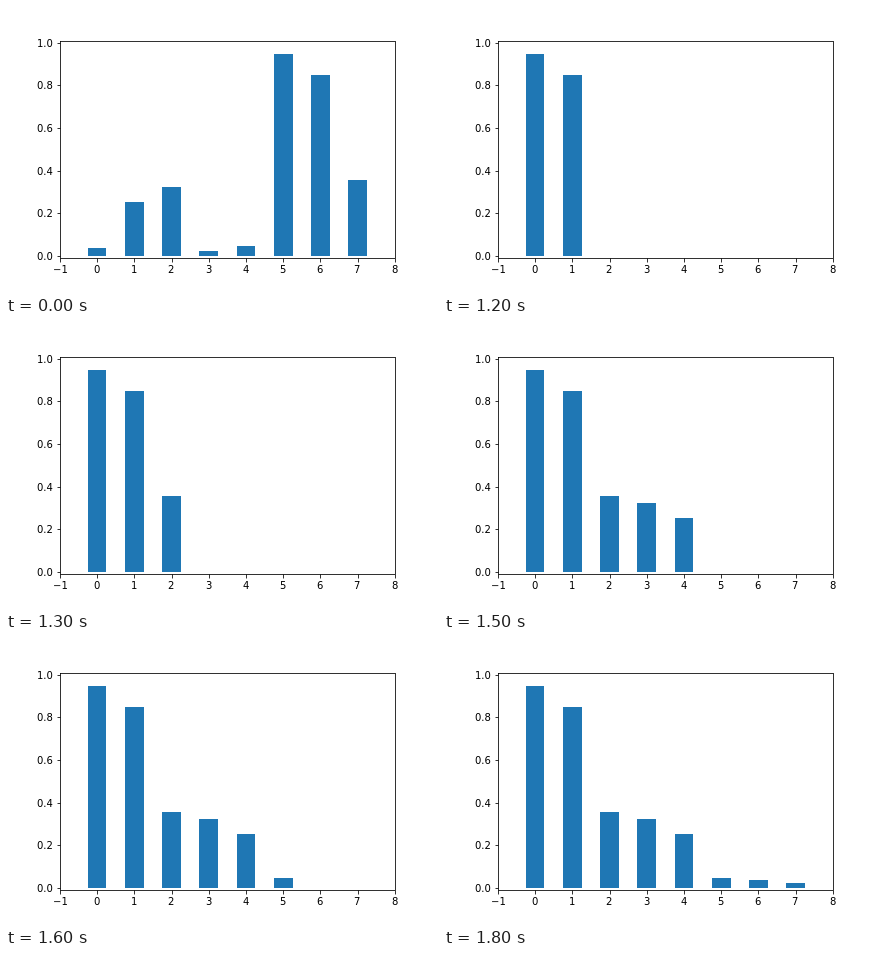
An HTML page with a canvas for the animation above (2.9 s loop, 432x288 px).

```html
<!DOCTYPE html>
<html lang="en">
<head>
<meta charset="utf-8">
<title>Sorted bars</title>
<style>
  html, body { margin: 0; width: 100%; height: 100%; overflow: hidden; background: #fff; }
  canvas { display: block; }
</style>
</head>
<body>
<canvas id="chart" width="432" height="288"></canvas>
<script>
const ctx = document.getElementById('chart').getContext('2d');
const LOOP = 2900, HOLD = 1100, STEP = 100;
const LEFT = 54, RIGHT = 389, TOP = 35, BOTTOM = 252, BASE = 250;

// Bar edges and bar tops in whole pixels.
const edges = [[82, 100], [119, 138], [156, 175], [193, 212],
               [231, 249], [268, 287], [305, 324], [342, 361]];
const tops = [242, 196, 181, 245, 240, 48, 69, 174];
const sorted = [...tops].sort((a, b) => a - b);

const xPos = v => 54 + (v + 1) * 37.2;
const yPos = v => 249.87 - v * 213.18;

function line(x1, y1, x2, y2) {
  ctx.beginPath();
  ctx.moveTo(x1 + 0.5, y1 + 0.5);
  ctx.lineTo(x2 + 0.5, y2 + 0.5);
  ctx.stroke();
}

function drawBars(list) {
  ctx.fillStyle = '#1f77b4';
  list.forEach((top, i) => {
    const [a, b] = edges[i];
    ctx.fillRect(a, top, b - a, BASE - top);
  });
}

function drawAxes() {
  ctx.strokeStyle = ctx.fillStyle = '#000';
  ctx.lineWidth = 0.8;
  ctx.font = '10px "DejaVu Sans", sans-serif';
  ctx.textBaseline = 'alphabetic';
  ctx.textAlign = 'left';

  for (let v = -1; v <= 8; v++) {
    const x = Math.round(xPos(v));
    const label = String(v).replace('-', '\u2212');
    line(x, BOTTOM, x, BOTTOM + 4);
    ctx.fillText(label, Math.round(xPos(v) - ctx.measureText(label).width / 2), 267);
  }
  for (let i = 0; i <= 5; i++) {
    const y = yPos(i / 5);
    line(LEFT, Math.round(y), LEFT - 3, Math.round(y));
    ctx.fillText((i / 5).toFixed(1), 31, Math.round(y + 4));
  }
  ctx.strokeRect(LEFT + 0.5, TOP + 0.5, RIGHT - LEFT, BOTTOM - TOP);
}

function draw(t) {
  ctx.fillStyle = '#fff';
  ctx.fillRect(0, 0, 432, 288);
  const count = Math.min(8, Math.floor((t - HOLD) / STEP) + 1);
  drawBars(t < HOLD ? tops : sorted.slice(0, count));
  drawAxes();
}

function tick(now) {
  draw(now % LOOP);
  requestAnimationFrame(tick);
}
draw(0);
requestAnimationFrame(tick);
</script>
</body>
</html>
```
